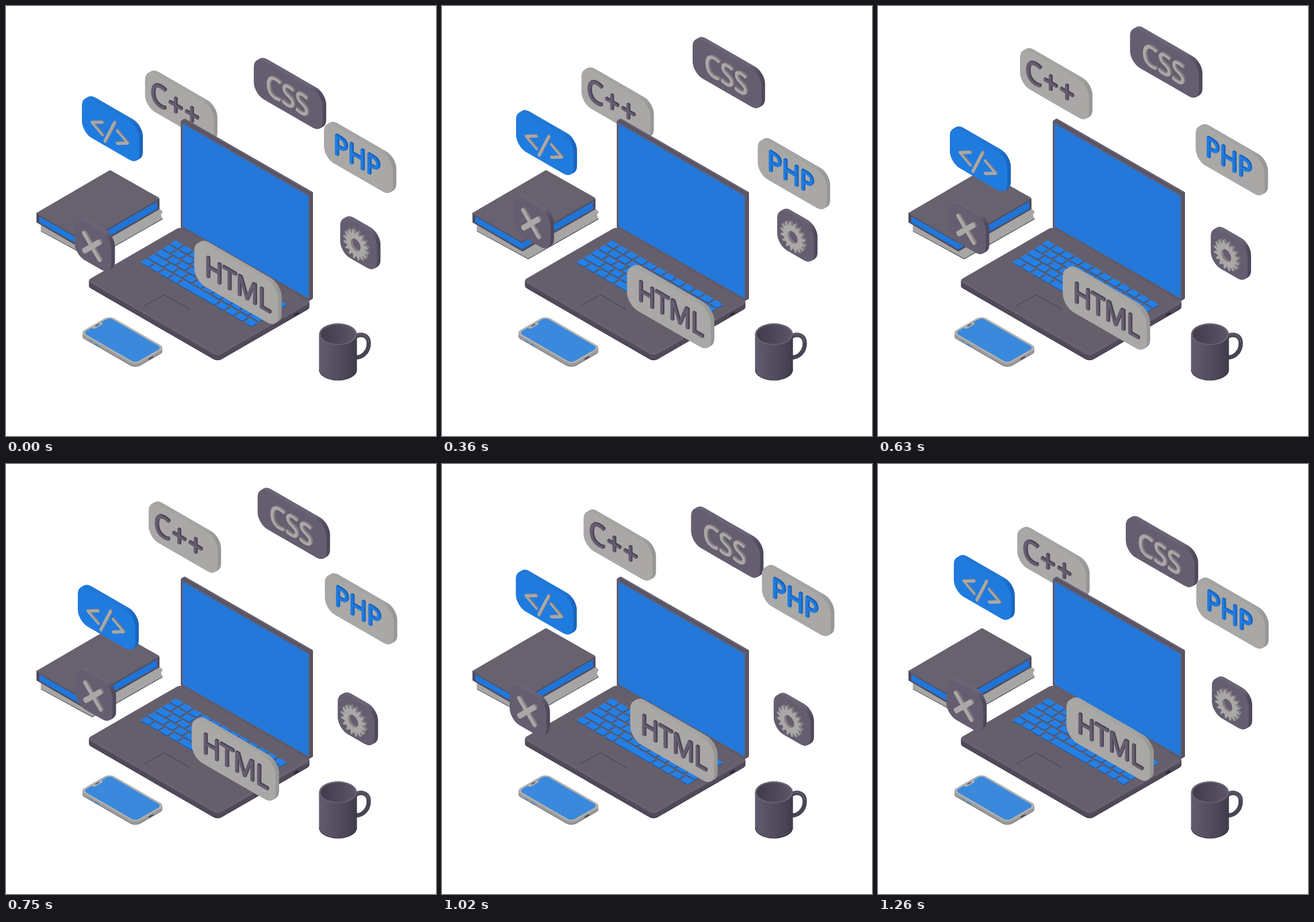
Animation of 748 by 748 pixels, one loop 1290 ms. Source, as an HTML page:

```html
<!DOCTYPE html>
<html lang="en">
<head>
<meta charset="utf-8">
<title>Isometric coding desk</title>
<style>
html, body { margin: 0; width: 100%; height: 100%; overflow: hidden; background: #fff; }
svg { display: block; width: 100vw; height: 100vh; }
text { font-family: "Open Sans", "Noto Sans", sans-serif; text-anchor: middle; stroke-width: 1.5; stroke-linejoin: round; }
</style>
</head>
<body>
<svg id="stage" viewBox="0 0 748 748" xmlns="http://www.w3.org/2000/svg"></svg>
<script>
const LOOP = 1290, STEP = 30, SWAY = 27.5, DRIFT = 0.135;
const DARK = '#645e70', GRAY = '#a9a8a6', BLUE = '#207bdf', TEXT_SIDE = '#807e80';

// Isometric planes: upright (facing left) and lying flat.
const wall = (x, y) => `transform="matrix(.866 .5 0 1 ${x} ${y})"`;
const floor = (x, y) => `transform="matrix(.866 .5 -.866 .5 ${x} ${y})"`;

const rect = (x, y, w, h, r, fill) =>
  `<rect x="${x}" y="${y}" width="${w}" height="${h}" rx="${r}" fill="${fill}"/>`;
const poly = (pts, fill, round = 0) =>
  `<polygon points="${pts}" fill="${fill}" stroke="${fill}" stroke-width="${round}" stroke-linejoin="round"/>`;
const line = (pts, color, w) =>
  `<polyline points="${pts}" fill="none" stroke="${color}" stroke-width="${w}" stroke-linecap="round" stroke-linejoin="round"/>`;
const shade = (id, ...stops) => `<linearGradient id="${id}">` +
  stops.map(([at, c]) => `<stop offset="${at}" stop-color="${c}"/>`).join('') + '</linearGradient>';

// Slab sides: lit along the top, darker on the right.
const defs = '<defs>' +
  shade('darkSide', [0.8, '#6a6477'], [0.97, '#4f495b']) +
  shade('graySide', [0.8, '#a5a4a2'], [0.97, '#989795']) +
  shade('blueSide', [0.8, '#2277d4'], [0.97, '#1a66bd']) +
  shade('mugSide', [0, '#625c6f'], [0.35, '#575163'], [0.8, '#494454'], [1, '#3f3a4a']) +
  shade('mugIn', [0, '#403b4b'], [1, '#5b5567']) + '</defs>';

// Stacks copies of a shape along the depth axis, nearest last.
function extrude(draw, back, front, side, face) {
  let out = '';
  for (let d = back; d >= front; d--) {
    out += `<g ${wall(d * 0.866, -d * 0.5)}>${draw(d === front ? face : side)}</g>`;
  }
  return out;
}

const slab = (w, h, r, face, side) =>
  extrude(c => rect(-w / 2, -h / 2, w, h, r, c), 7, 0, `url(#${side})`, face);

const label = (str, size, x, y, face, side, spacing = 0) => extrude(c =>
  `<text x="${x}" y="${y + size * 0.357}" font-size="${size}" letter-spacing="${spacing}" fill="${c}" stroke="${c}">${str}</text>`,
  0, -3, side, face);

const tag = c => `<g transform="translate(0 4.5)">` +
  line('-15,-11 -36,0 -15,11', c, 4.8) + line('10,-23 -10,20', c, 4.8) +
  line('15,-11 36,0 15,11', c, 4.8) + '</g>';

const cross = c => line('-15,-15 15,15', c, 8) + line('15,-15 -15,15', c, 8);

function gear(c) {
  const teeth = 16, pts = [];
  for (let i = 0; i < teeth; i++) {
    for (const [r, k] of [[19, 0], [25, 0.3], [25, 0.52], [19, 0.72]]) {
      const a = (i + k) / teeth * 2 * Math.PI;
      pts.push((r * Math.cos(a) - 1).toFixed(1) + ' ' + (r * Math.sin(a)).toFixed(1));
    }
  }
  return `<path fill-rule="evenodd" fill="${c}" d="M${pts.join('L')}ZM-11 0a10 10 0 1 0 20 0a10 10 0 1 0 -20 0Z"/>`;
}

// x, y: middle of the sway; low: time of the lowest point.
const badges = {
  cpp: { x: 304.5, y: 155.7, low: 153, art:
    slab(138.5, 66.5, 20, GRAY, 'graySide') + label('C++', 52, -6, -1.6, DARK, '#4a4556', 3) },
  css: { x: 494.7, y: 126.7, low: 1258, art:
    slab(138.5, 66.5, 20, DARK, 'darkSide') + label('CSS', 50, 0.5, 0, GRAY, TEXT_SIDE) },
  php: { x: 612.9, y: 266.2, low: 330, art:
    slab(138.5, 66.5, 20, GRAY, 'graySide') + label('PHP', 48.5, -1, -4, BLUE, '#1a63b8') },
  tag: { x: 178.5, y: 241.7, low: 700, art:
    slab(115.5, 67, 20, BLUE, 'blueSide') + extrude(tag, 0, -2, TEXT_SIDE, GRAY) },
  cross: { x: 153.3, y: 403, low: 1077, art:
    slab(74, 67, 20, DARK, 'darkSide') + extrude(cross, 0, -3, TEXT_SIDE, GRAY) },
  gear: { x: 612, y: 423.7, low: 890, art:
    slab(74, 67, 20, DARK, 'darkSide') + extrude(gear, -1, -5, TEXT_SIDE, GRAY) },
  html: { x: 397.5, y: 504.2, low: 510, art:
    slab(168.6, 74, 22, GRAY, 'graySide') + label('HTML', 49, 5, -2, DARK, '#4a4556') }
};

function books() {
  return poly('61,381 139,420 264,350 272,358 269,364 272,370 150,439 61,390', '#a6a5a3', 1) +
    line('61,391.5 150,440 272,370.5', '#4a4656', 1.2) +
    poly('54,361 139,410 266,336 266,353 140,426 54,376', '#514b5d', 2) +
    poly('58,366 139,412 139,423 58,376.5', '#1f78dc') +
    poly('139,412 264,339.5 262,346 264,352.5 139,423.5', '#1f74d6') +
    poly('54,361 181,287 265,334.5 138,408', '#68626f', 3) +
    line('54,362.5 138,410.5 265,337', '#565061', 1.6);
}

function phone() {
  let out = '';
  for (let d = 6; d >= 0; d--) {
    out += `<g ${floor(180, 538.5 + d)}>${rect(0, 0, 112, 60, 10, d === 6 ? '#6d6a70' : d ? '#9b9a99' : '#b1b0ae')}</g>`;
  }
  out += `<g ${floor(180, 538.5)}>${rect(3.5, 3.5, 105, 53, 7, '#3a89dc')}${rect(2, 20, 6, 19, 2.5, '#b1b0ae')}${rect(3.5, 25, 2, 8, 1, '#4d485a')}</g>`;
  return out + line('249,614 255,610.6', '#4d485a', 2.4) +
    line('146,583 149,584.7', '#3a89dc', 2) + line('155,588.2 161,591.7', '#3a89dc', 2);
}

function mug() {
  return `<path d="M605 577C617 568 631 572 631 587C631 602 619 613 606 611" fill="none" stroke="#494454" stroke-width="7.5"/>
    <path d="M606 574.5C618 568 629 571 631 585" fill="none" stroke="#5d5768" stroke-width="3"/>
    <path d="M544.5 571V632A33 19 0 0 0 610.5 632V571Z" fill="url(#mugSide)"/>
    <path d="M545 632.5A32.5 18.5 0 0 0 610 632.5" fill="none" stroke="#393444" stroke-width="1.2"/>
    <ellipse cx="577.5" cy="571" rx="33" ry="19" fill="#676172"/>
    <ellipse cx="577.5" cy="571.3" rx="30" ry="16.7" fill="url(#mugIn)"/>`;
}

function keys() {
  const first = [1, 1, 1.3, 1.8, 1];
  let low = '', top = '';
  first.forEach((lead, row) => {
    let x = 0, n = 0;
    while (x < 11.9) {
      let w = n ? 1 : lead;
      if (row === 4 && n === 4) w = 4;
      if (12 - x - w < 0.6) w = 12 - x;
      const key = c => rect((x + 0.08).toFixed(2), row + 0.1, (w - 0.18).toFixed(2), 0.78, 0.08, c);
      low += key('#2a5590');
      top += key('#2480e6');
      x += w;
      n++;
    }
  });
  const at = (y, s) => `<g transform="matrix(16.4 9.42 -12.8 8 295 ${y})">${s}</g>`;
  return at(407.6, low) + at(406, top);
}

function base() {
  let out = '';
  for (let d = 9; d >= 0; d--) {
    out += `<g ${floor(304, 383.5 + d)}>${rect(0, 0, 263, 189, 8, d === 9 ? '#302b3a' : d ? '#504a5b' : '#655f6c')}</g>`;
  }
  return out + line('147,479 368,606 525,516', '#6e6876', 1) +
    line('502,537.5 508,534', '#2b2735', 3) + keys() +
    line('241,521 276,502.5 321,528.5', '#494453', 1.3) +
    line('241,521 285,547 321,528.5', '#5f5966', 1);
}

function lid() {
  return poly('306,201 311,198 532,325 532,508 527,511 306,384', '#595364', 4) +
    poly('306,202 527,329 527,510 306,384', '#625c6b', 3) +
    line('306,199.5 310,197 530,323.5', '#6a6474', 2) +
    poly('308,206 525.5,331 525.5,507 308,383', '#2378da', 1.5);
}

const slot = name => `<g id="${name}">${badges[name].art}</g>`;
const stage = document.getElementById('stage');
stage.innerHTML = defs + slot('cpp') + books() + base() + lid() + phone() + mug() +
  ['css', 'php', 'tag', 'cross', 'gear', 'html'].map(slot).join('');

const nodes = Object.keys(badges).map(name => [document.getElementById(name), badges[name]]);

function render(ms) {
  const t = Math.floor((ms % LOOP) / STEP) * STEP;
  for (const [node, b] of nodes) {
    const dy = SWAY * Math.cos((t - b.low) / LOOP * 2 * Math.PI);
    node.setAttribute('transform', `translate(${(b.x - DRIFT * dy).toFixed(2)} ${(b.y + dy).toFixed(2)})`);
  }
}

function tick() {
  render(performance.now());
  requestAnimationFrame(tick);
}
tick();
</script>
</body>
</html>
```
